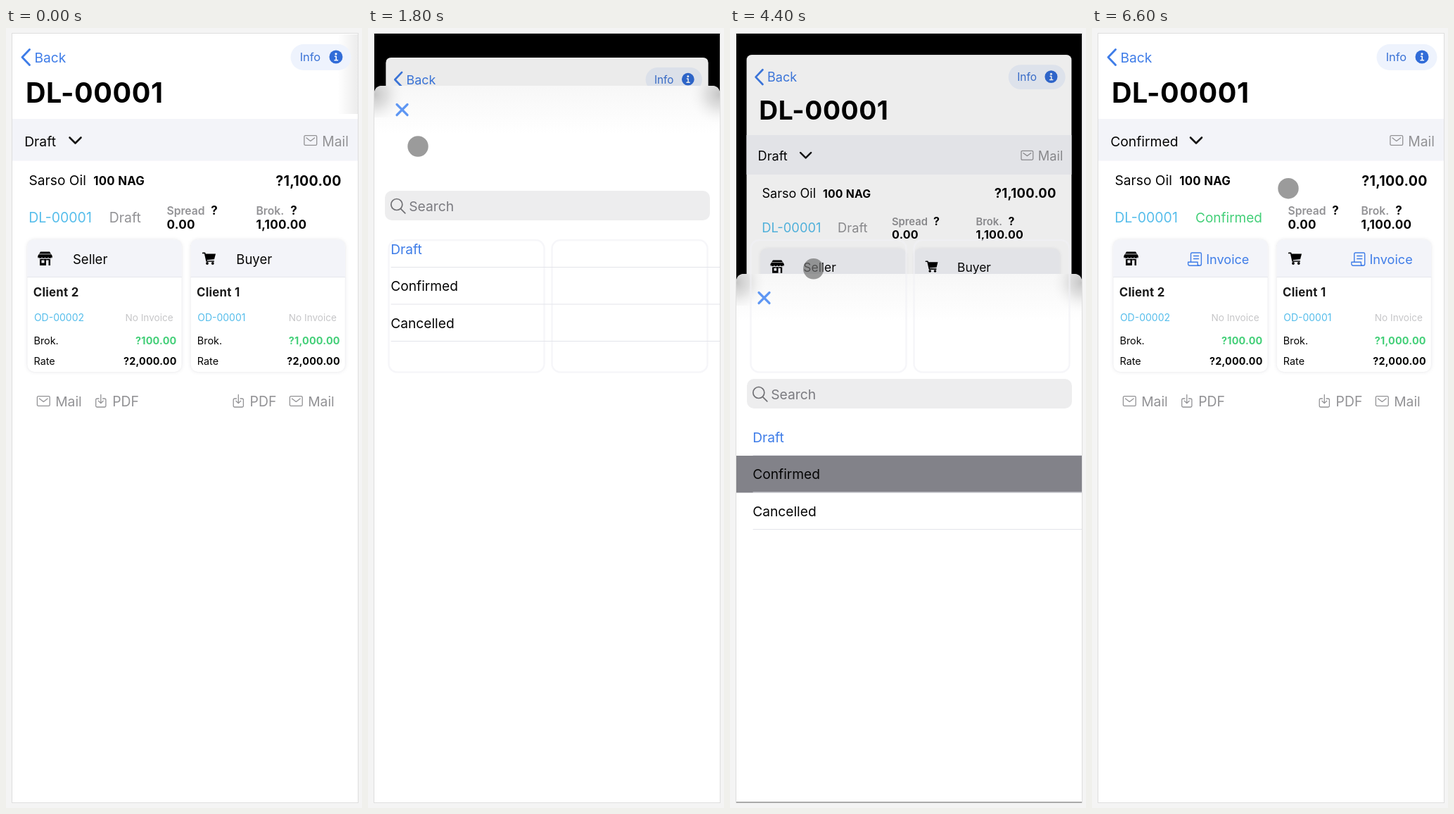
These frames come from a looping animation (506x1107 px, 8.28 s). An HTML page:

```html
<!DOCTYPE html>
<html lang="en">
<head>
<meta charset="utf-8">
<title>Deal status</title>
<style>
html, body { margin: 0; width: 100%; height: 100%; overflow: hidden; background: #f4f4f4; }
svg { display: block; width: 100%; height: 100%; }
text { font-family: Inter, "Open Sans", sans-serif; white-space: pre; }
text[font-weight="700"] { letter-spacing: .015em; }
.line { fill: none; stroke-linecap: round; stroke-linejoin: round; }
.card { filter: drop-shadow(0 0 2.5px rgba(40, 40, 70, .14)); }
</style>
</head>
<body>
<svg id="stage" viewBox="0 0 506 1107"></svg>
<script>
const LOOP = 8280, STEP = 200;
const BLUE = '#3f7de8', SKY = '#55bdeb', GREEN = '#43cf78', GRAY = '#929295', BLACK = '#050505', TINT = '#f3f4f9';

// y is the middle of the capital letters
const text = (s, x, y, size, fill = BLACK, weight = 400, anchor = 'start') =>
  `<text x="${x}" y="${y + size * .364}" font-size="${size}" fill="${fill}" font-weight="${weight}" text-anchor="${anchor}">${s}</text>`;
const rect = (x, y, w, h, fill, r = 0, extra = '') =>
  `<rect x="${x}" y="${y}" width="${w}" height="${h}" rx="${r}" fill="${fill}" ${extra}/>`;
const line = (d, color, width) => `<path class="line" d="${d}" stroke="${color}" stroke-width="${width}"/>`;
const move = (x, y, body) => `<g transform="translate(${x} ${y})">${body}</g>`;

const envelope = (x, y) => move(x, y,
  line('M2 .7h14.6q1.6 0 1.6 1.6v10.4q0 1.6-1.6 1.6h-14.6q-1.6 0-1.6-1.6v-10.4q0-1.6 1.6-1.6zM3.5 4l5.8 4.4 5.8-4.4', GRAY, 1.3));
const download = (x, y) => move(x, y,
  line('M5 6h-2.6q-1.7 0-1.7 1.7v8.6q0 1.7 1.7 1.7h10.8q1.7 0 1.7-1.7v-8.6q0-1.7-1.7-1.7h-2.6M7.8.5v12M4.4 9.2l3.4 3.4 3.4-3.4', GRAY, 1.3));
const receipt = (x, y) => move(x, y,
  line('M4.5 13v-10.8q0-1.7 1.7-1.7h11.5q1.7 0 1.7 1.7v14q0 2.5-2.5 2.5h-13.9q-2.4 0-2.4-2.5v-2.5h13.5v2.5q0 2.5 2.8 2.5M8.5 5h7M8.5 9h7', BLUE, 1.4));
const store = move(45.5, 317.5,
  `<path d="M3.5 0h13l3.8 6q.4 3.7-2.8 4.2v9.3h-15v-9.3q-3.2-.5-2.8-4.2z" fill="#000"/>` +
  line('M2 3.4h16', '#eee', .8) +
  line('M1 8.8q2.3 2.3 4.5 0q2.2 2.3 4.5 0q2.3 2.3 4.5 0q2.3 2.3 4.5 0', TINT, 1.2) +
  rect(5, 12, 4, 4, TINT) + rect(11.5, 12, 3.5, 7.5, TINT));
const cart = move(279, 318.5,
  `<path d="M4.2 2h14.8l-2 7.8-10.8 1z" fill="#000"/><circle cx="7" cy="15.5" r="1.9"/><circle cx="14.8" cy="15.5" r="1.9"/>` +
  line('M.8.9h2.8l2.6 11.6h10', '#000', 1.7));

function card(x, icon, label, client, order, brokerage) {
  const right = x + 212;
  return `<g class="card">${rect(x, 300.5, 219, 187.5, '#fff', 10)}</g>` +
    `<path d="M${x} 353v-42.5q0-10 10-10h199q10 0 10 10v42.5z" fill="${TINT}"/>` +
    line(`M${x} 353.5h219`, '#e6e7ec', 1) + icon +
    `<g class="before">${text(label, x + 64.5, 328, 18.5)}</g>` +
    `<g class="after">${receipt(x + 105.5, 318.5)}${text('Invoice', x + 131.7, 328, 18.1, BLUE)}</g>` +
    text(client, x + 8.3, 375, 16.8, '#1b1b1b', 700) +
    text(order, x + 9.4, 411, 14, SKY) +
    text('No Invoice', x + 207.2, 411, 13.6, '#c6c6c8', 400, 'end') +
    text('Brok.', x + 9, 444, 14.4) + text(brokerage, right, 444, 14.4, GREEN, 700, 'end') +
    text('Rate', x + 9, 472.5, 14.4) + text('?2,000.00', right, 472.5, 14.3, BLACK, 700, 'end');
}

const amount = (x, label, value, markX, id) => `<g id="${id}">` +
  text(label, x - .5, 259, 15.7, GRAY, 600) + text('?', markX - .3, 258.5, 17, BLACK, 700) +
  text(value, x - .5, 278.5, 17.1, BLACK, 700) + '</g>';
const status = (label, arrowX, id) => `<g id="${id}">` + text(label, 26.2, 160.5, 19.3) +
  line(`M${arrowX} 155.5l8 8 8-8`, '#151515', 2.6) + '</g>';

const page =
  rect(9, 8, 491, 1091, '#fff') +
  rect(472, 9, 28, 113, 'url(#edge)', 0, 'id="edgeShade"') +
  line('M33.5 30.5l-10.5 11 10.5 11', BLUE, 2.9) + text('Back', 40.4, 41.8, 19.2, BLUE) +
  rect(404.5, 23, 86, 37, '#eef3fd', 18.5) + text('Info', 417.7, 41.5, 16.4, '#3b73d6') +
  `<circle cx="469" cy="41" r="9.5" fill="#316cd8"/>` +
  `<circle cx="469" cy="36.8" r="1.6" fill="#fff"/>` + line('M467.5 40.2h1.8v5.2M467 45.7h4.5', '#fff', 1.6) +
  text('DL-00001', 28, 91.5, 39.5, '#000', 700) +
  rect(9, 129, 491, 59.5, TINT) +
  status('Draft', 90.5, 'draft') + status('Confirmed', 140, 'confirmed') +
  envelope(423.5, 152) + text('Mail', 449.2, 160.5, 19.4, GRAY) +
  text('Sarso Oil', 32.5, 216.5, 19.2) + text('100 NAG', 124.3, 217, 16.8, BLACK, 700) +
  text('?1,100.00', 476.8, 216.5, 19.6, BLACK, 700, 'end') +
  text('DL-00001', 32.3, 269, 19.5, SKY) +
  `<g class="before">${text('Draft', 146.8, 269, 19.4, GRAY)}</g>` +
  `<g class="after">${text('Confirmed', 147, 269, 19, GREEN)}</g>` +
  amount(229, 'Spread', '0.00', 291.5, 'spread') + amount(356, 'Brok.', '1,100.00', 404.5, 'brok') +
  card(30.5, store, 'Seller', 'Client 2', 'OD-00002', '?100.00') +
  card(262.8, cart, 'Buyer', 'Client 1', 'OD-00001', '?1,000.00') +
  envelope(44, 522) + text('Mail', 70.2, 530, 19.3, GRAY) +
  download(127, 520) + text('PDF', 151.2, 530, 19.4, GRAY) +
  download(322.5, 520) + text('PDF', 346.5, 530, 19.4, GRAY) +
  envelope(403, 522) + text('Mail', 429.2, 530, 19.3, GRAY) +
  rect(9, 8, 491, 1091, '#000', 0, 'id="dim"');

// Both sheet layers are measured from the sheet's top edge
const sheetBack =
  `<path d="M9 1100v-1088q0-12 12-12h467q12 0 12 12v1088z" fill="#fff"/>` +
  `<path d="M9 68v-56q0-12 12-12h467q12 0 12 12v56z" fill="url(#top)"/>` +
  `<path d="M9 45v-33q0-12 12-12h40v45z" fill="url(#left)"/>` +
  `<path d="M455 0h33q12 0 12 12v56h-45z" fill="url(#right)"/>` +
  rect(24, 149, 462, 42, '#ededee', 10);
const sheetFront =
  rect(9, 258, 491, 52.5, '#828289', 0, 'id="pressed"') +
  line('M41 26.5l15 15M56 26.5l-15 15', '#5f97f3', 3.2) +
  `<circle class="line" cx="40.8" cy="168.5" r="8" stroke="#707074" stroke-width="1.7"/>` +
  line('M46.8 174.8l6 6', '#707074', 1.7) + text('Search', 58.2, 170.5, 19.3, '#7b7b80') +
  ['Draft', 'Confirmed', 'Cancelled'].map((label, i) =>
    text(label, 32.2, 232 + i * 52.5, 19.2, i ? BLACK : BLUE) +
    line(`M33 ${257.5 + i * 52.5}h467`, '#e3e4ea', 1)).join('');

const outlines = [30, 262].map(x => rect(x - .5, 301, 221, 187.5, 'none', 12, 'stroke="#f1f1f6" stroke-width="2.5" opacity=".65"')).join('');
const trail = rect(9, 170, 491, 18.5, TINT) + rect(23, 129, 463, 22, TINT) +
  rect(30.5, 300.5, 219, 53, '#f2f3f8', 8) + rect(262.8, 300.5, 219, 53, '#f2f3f8', 8) +
  `<g opacity=".07">${text('Seller', 95, 328, 18.5)}${text('Buyer', 327.3, 328, 18.5)}${store}${cart}</g>`;

const stop = (offset, color, opacity = 1) => `<stop offset="${offset}" stop-color="${color}" stop-opacity="${opacity}"/>`;
const corner = (id, x) => `<radialGradient id="${id}" gradientUnits="userSpaceOnUse" cx="${x}" cy="12" r="46">` +
  stop(0, '#bbb', .85) + stop(.4, '#ccc', .55) + stop(1, '#fff', 0) + '</radialGradient>';

document.getElementById('stage').innerHTML =
  `<defs><clipPath id="screen">${rect(9, 8, 491, 1091, '#000')}</clipPath>` +
  `<clipPath id="pageClip"><rect id="pageShape" x="9" y="8" width="491" height="1110"/></clipPath>` +
  `<linearGradient id="edge">${stop(0, '#fff')}${stop(1, '#ececec')}</linearGradient>` +
  `<linearGradient id="top" x2="0" y2="1">${stop(0, '#f7f7f7')}${stop(1, '#fff')}</linearGradient>` +
  corner('left', 9) + corner('right', 500) + '</defs>' +
  `<g clip-path="url(#screen)">${rect(9, 8, 491, 1091, '#000')}` +
  `<g id="page" clip-path="url(#pageClip)">${page}</g>` +
  `<g id="sheetBack">${sheetBack}</g><g id="outlines">${outlines}</g><g id="trail">${trail}</g>` +
  `<g id="sheetFront">${sheetFront}</g>` +
  rect(9, 8, 0, 2, '#8fb3f2', 0, 'id="progress"') + '</g>' +
  rect(8.5, 7.5, 492, 1092, 'none', 0, 'stroke="#dedede"') +
  `<path id="base" d="M9 1098.8h491" stroke="#858585" stroke-width="1.3"/>` +
  `<g id="cursor"><circle r="14.7" fill="#707070" fill-opacity=".7"/>` +
  `<circle id="ring" r="33.3" fill="none" stroke="#080808" stroke-width="2.3"/></g>`;

// [time, values...]: each row holds until the next one
const CURSOR = [
  [200, 463, 514], [400, 290, 320], [600, 110, 190], [800, 71, 168],
  [2400, 133, 187], [2600, 148, 232], [2800, 139, 290], [3000, 124, 330], [3200, 118.7, 341.8],
  [4800, 132, 332], [5000, 176, 302], [5200, 224.5, 270], [5400, 279, 227.7]];
const SHEET = [
  [0, 1110, 1], [1400, 500, .962], [1600, 164, .943], [1800, 82, .934], [2000, 60, .931], [2200, 55, .93],
  [4400, 349, .9415], [4600, 790, .978], [4800, 1040, .996], [5000, 1110, 1]];
const PROGRESS = [[0, 0], [4800, .35], [5000, .75], [5200, .94], [5400, 0]];

const at = (track, t) => track.findLast(row => row[0] <= t);
const between = (t, from, to) => t >= from && t < to;
const el = id => document.getElementById(id);
const set = (id, name, value) => el(id).setAttribute(name, value);
const show = (node, on) => { node.style.display = on ? '' : 'none'; };

function draw(t) {
  const [, top, scale] = at(SHEET, t);
  const pageTop = 8 + (1 - scale) * 514;
  set('page', 'transform', `translate(254.5 ${pageTop}) scale(${scale}) translate(-254.5 -8)`);
  set('pageShape', 'rx', scale < 1 ? 8 : 0);
  set('dim', 'opacity', (1 - scale) * 1.2);
  for (const id of ['sheetBack', 'sheetFront']) set(id, 'transform', `translate(0 ${top})`);

  const done = t >= 6000, confirmed = t >= 4800;
  document.querySelectorAll('.before').forEach(node => show(node, !done));
  document.querySelectorAll('.after').forEach(node => show(node, done));
  set('spread', 'transform', `translate(${done ? 50 : 0} 0)`);
  set('brok', 'transform', `translate(${done ? 27 : 0} 0)`);
  show(el('draft'), !confirmed);
  show(el('confirmed'), confirmed);
  show(el('edgeShade'), t < 1200);
  show(el('outlines'), between(t, 1600, 4600));
  show(el('trail'), between(t, 1600, 1800));
  show(el('pressed'), between(t, 4400, 5000));
  show(el('base'), between(t, 2200, 4600));
  set('progress', 'width', 491 * at(PROGRESS, t)[1]);

  const spot = at(CURSOR, t);
  show(el('cursor'), spot);
  if (spot) set('cursor', 'transform', `translate(${spot[1]} ${spot[2]})`);
  show(el('ring'), between(t, 1200, 1400) || between(t, 3800, 4400));
}

const start = performance.now();
function tick() {
  const t = (performance.now() - start) % LOOP;
  draw(Math.floor(t / STEP) * STEP);
  requestAnimationFrame(tick);
}
tick();
</script>
</body>
</html>
```
